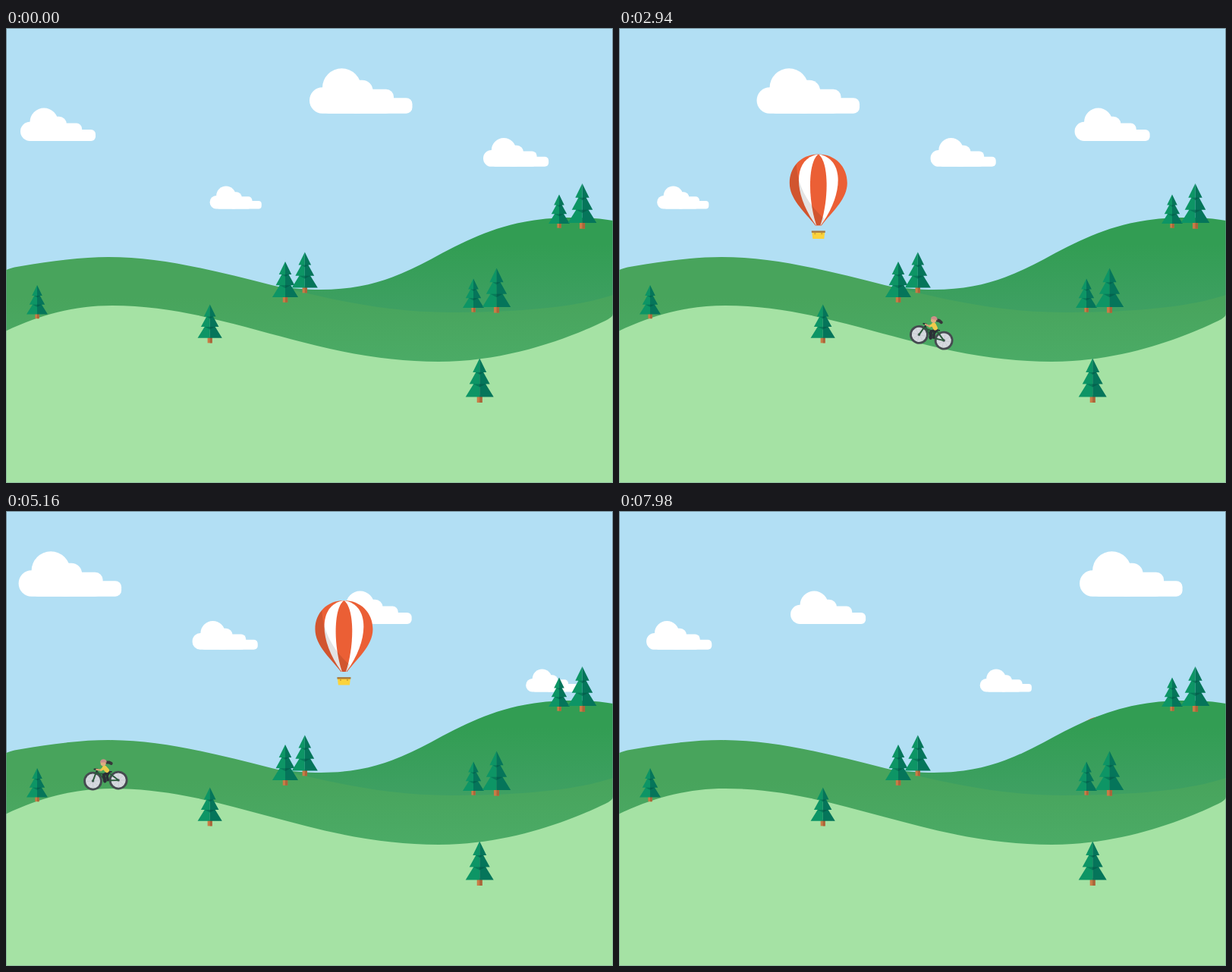
Write an HTML page that moves like this. It is 800 px wide and 600 px high and loops after 8000 ms.

```html
<!DOCTYPE html>
<html lang="en">
<head>
<meta charset="utf-8">
<title>Hills</title>
<style>
  html, body { margin: 0; width: 100%; height: 100%; overflow: hidden; }
  svg { display: block; width: 100%; height: 100%; }
</style>
</head>
<body>
<svg viewBox="0 0 800 600">
  <defs>
    <linearGradient id="backFill" gradientUnits="userSpaceOnUse" x1="0" y1="285" x2="0" y2="375">
      <stop offset="0" stop-color="#329d53"/><stop offset="1" stop-color="#3fa063"/>
    </linearGradient>
    <linearGradient id="midFill" gradientUnits="userSpaceOnUse" x1="0" y1="355" x2="0" y2="440">
      <stop offset="0" stop-color="#48a45c"/><stop offset="1" stop-color="#4bab66"/>
    </linearGradient>
    <g id="cloud" fill="#fff">
      <circle cx="42.5" cy="25.5" r="25.5"/>
      <rect y="25" width="80" height="34.5" rx="17"/>
      <rect x="40" y="15.5" width="43.5" height="40" rx="14"/>
      <rect x="50" y="27.5" width="61" height="32" rx="10"/>
      <rect x="17" y="39" width="118.5" height="20.5" rx="8"/>
    </g>
    <g id="cloudBand">
      <use href="#cloud" transform="translate(400 53.2)"/>
      <use href="#cloud" transform="translate(19 105.5) scale(.731)"/>
      <use href="#cloud" transform="translate(629 145) scale(.636)"/>
      <use href="#cloud" transform="translate(268.6 208.5) scale(.503)"/>
    </g>
    <g id="tree">
      <path fill="#c97c46" d="M-3.5 49h7v9.5h-7z"/>
      <path fill="#a9653a" d="M0 49h3.5v9.5h-3.5z"/>
      <path fill="#0d9565" d="M0 0L-9 18.5H-5L-13.5 34H-8L-18.5 51H0z"/>
      <path fill="#05755a" d="M0 0L9 18.5H5L13.5 34H8L18.5 51H0z"/>
      <path fill="#067a58" d="M-5 18.5H0V21.5zM-8 34H0V38z"/>
      <path fill="#04624e" d="M5 18.5H0V21.5zM8 34H0V38z"/>
    </g>
    <path id="envelope" d="M0 0C22 0 38 16 38 38C38 60 16 78 4 94H-4C-16 78 -38 60 -38 38C-38 16 -22 0 0 0z"/>
    <clipPath id="envelopeClip"><use href="#envelope"/></clipPath>
    <g id="wheel">
      <circle r="11" fill="#d6d9df" stroke="#454b50" stroke-width="2.8"/>
      <path d="M-9 0H9M0 -9V9M-6.5 -6.5L6.5 6.5M-6.5 6.5L6.5 -6.5" stroke="#c0c4cb" stroke-width=".6"/>
      <circle r="1.8" fill="#5d636a"/>
    </g>
    <path id="flight" d="M118 309C216 206 305 107 393 107C475 107 555 195 637 271"/>
  </defs>

  <rect width="800" height="600" fill="#b2dff4"/>
  <rect x=".5" y=".5" width="799" height="599" fill="none" stroke="#748e98"/>
  <g id="clouds"><use href="#cloudBand"/><use href="#cloudBand" x="800"/></g>

  <g id="balloon">
    <use href="#envelope" fill="#eb5f35"/>
    <g clip-path="url(#envelopeClip)">
      <path fill="#fff" d="M0 0C-34 5 -34 52 -3 94H3C34 52 34 5 0 0z"/>
      <path fill="#eb5f35" d="M0 0C-14 10 -14 60 -2.5 94H2.5C14 60 14 10 0 0z"/>
      <path fill="#000" fill-opacity=".11" d="M-29 8C-30 42 -10 70 8 85L4 95H-40V8z"/>
    </g>
    <path fill="#fbd33c" d="M-8.5 103H8.5L7.5 111.5H-7.5z"/>
    <path fill="#a9783a" d="M-9 101H9V103.4H-9z"/>
    <path fill="#d9a62d" d="M-5.5 103.4h2v2.5h-2zM3.5 103.4h2v2.5h-2z"/>
  </g>

  <path fill="url(#backFill)" d="M360 341C375 343 395 345 415 345C475 345 515 329 560 305C615 275 665 250 745 250C765 250 785 251.5 800 254V600H360z"/>
  <path fill="url(#midFill)" d="M0 319.5C4 317 12 315 20 314C60 307 100 302 135 302C205 302 275 320 350 339C430 358 500 375 585 375C670 375 750 369 800 352V600H0z"/>
  <path id="ground" fill="#a5e2a4" d="M-100 450L0 399.5C45 378 90 366 140 366C288 366 405 440 570 440C660 440 740 410 790 386C800 381 800 378 800 376L900 330V600H-100z"/>
  <path d="M.5 320V599.5H799.5V254" fill="none" stroke="#748e98" stroke-opacity=".45"/>

  <use href="#tree" transform="translate(41 339) scale(.755)"/>
  <use href="#tree" transform="translate(268.7 364.5) scale(.87)"/>
  <use href="#tree" transform="translate(368 308) scale(.92)"/>
  <use href="#tree" transform="translate(393.8 295.5) scale(.92)"/>
  <use href="#tree" transform="translate(616 330.5) scale(.755)"/>
  <use href="#tree" transform="translate(646.5 316.5) scale(1.01)"/>
  <use href="#tree" transform="translate(729 219.5) scale(.755)"/>
  <use href="#tree" transform="translate(759.5 205) scale(1.02)"/>
  <use href="#tree" transform="translate(624.2 435.5)"/>

  <g id="bike" fill="none" stroke-linecap="round" stroke-linejoin="round">
    <use href="#wheel" x="-16.8"/>
    <use href="#wheel" x="16.8"/>
    <path stroke="#2c5a3c" stroke-width="2" d="M-16.8 0L-11.5 -13L-1 -1L5 -10L16.8 0H-1M-11 -10L4 -8"/>
    <path stroke="#2b3136" stroke-width="1.8" d="M-14.5 -15.5L-10.5 -15.5L-11.5 -12M2 -11.5H8"/>
    <circle cx="-1" cy="-.5" r="2.6" fill="#40464c"/>
    <path stroke="#2b3036" stroke-width="4" d="M4 -11L-2.5 -7.5L-1 1"/>
    <path stroke="#2b3036" stroke-width="3.4" d="M4 -11L2 -6L3 -1"/>
    <path stroke="#eecb4b" stroke-width="6" d="M-1 -17L2 -13.5"/>
    <path stroke="#eecb4b" stroke-width="3" d="M-2 -16.5L-6 -14"/>
    <path stroke="#d9a678" stroke-width="2.2" d="M-6 -14L-11.5 -15"/>
    <path stroke="#37373a" stroke-width="4" d="M1.5 -24L5 -24L8 -22.5"/>
    <circle cx="-2.5" cy="-23" r="3.6" fill="#dfae80"/>
    <path fill="#cc8f89" d="M-6.8 -24C-6 -30 2 -29.5 2.2 -24z"/>
  </g>
</svg>
<script>
const LOOP = 8000, STEP = 30;
const DRIFT = .0743; // cloud speed, px per ms
const LIFT_OFF = 722, TOUCH_DOWN = 7955;
const el = id => document.getElementById(id);
const [clouds, balloon, flight, ground, bike] =
  ['clouds', 'balloon', 'flight', 'ground', 'bike'].map(el);
const flightLength = flight.getTotalLength();

const place = (node, x, y, tilt = 0) =>
  node.setAttribute('transform', `translate(${x.toFixed(2)} ${y.toFixed(2)}) rotate(${tilt.toFixed(2)})`);

// Height of the front hill, by bisection along its upper edge.
function groundY(x) {
  let low = 0, high = 1100, point;
  for (let i = 0; i < 18; i++) {
    const middle = (low + high) / 2;
    point = ground.getPointAtLength(middle);
    if (point.y < 600 && point.x < x) low = middle; else high = middle;
  }
  return point.y;
}

// The balloon slows down slightly along its arc.
function moveBalloon(time) {
  const u = Math.min(Math.max((time - LIFT_OFF) / (TOUCH_DOWN - LIFT_OFF), 0), 1);
  const { x, y } = flight.getPointAtLength(flightLength * u * (1.03 - .03 * u));
  place(balloon, x, y);
}

// The bike is fastest in the valley and slowest on the crest.
function moveBike(time) {
  const reach = 16.5, axle = 11;
  const x = 864.8 - .1458 * time - 28.7 * Math.sin(2 * Math.PI * (time - 2150) / 4900);
  const rear = groundY(x + reach), lead = groundY(x - reach);
  const tilt = Math.atan2(rear - lead, 2 * reach) * 180 / Math.PI;
  place(bike, x, (rear + lead) / 2 - axle, tilt);
}

function render(time) {
  place(clouds, -DRIFT * time, 0);
  moveBalloon(time);
  moveBike(time);
}

let start;
function tick(now) {
  start ??= now;
  render(Math.floor(((now - start) % LOOP) / STEP) * STEP);
  requestAnimationFrame(tick);
}
render(0);
requestAnimationFrame(tick);
</script>
</body>
</html>
```
